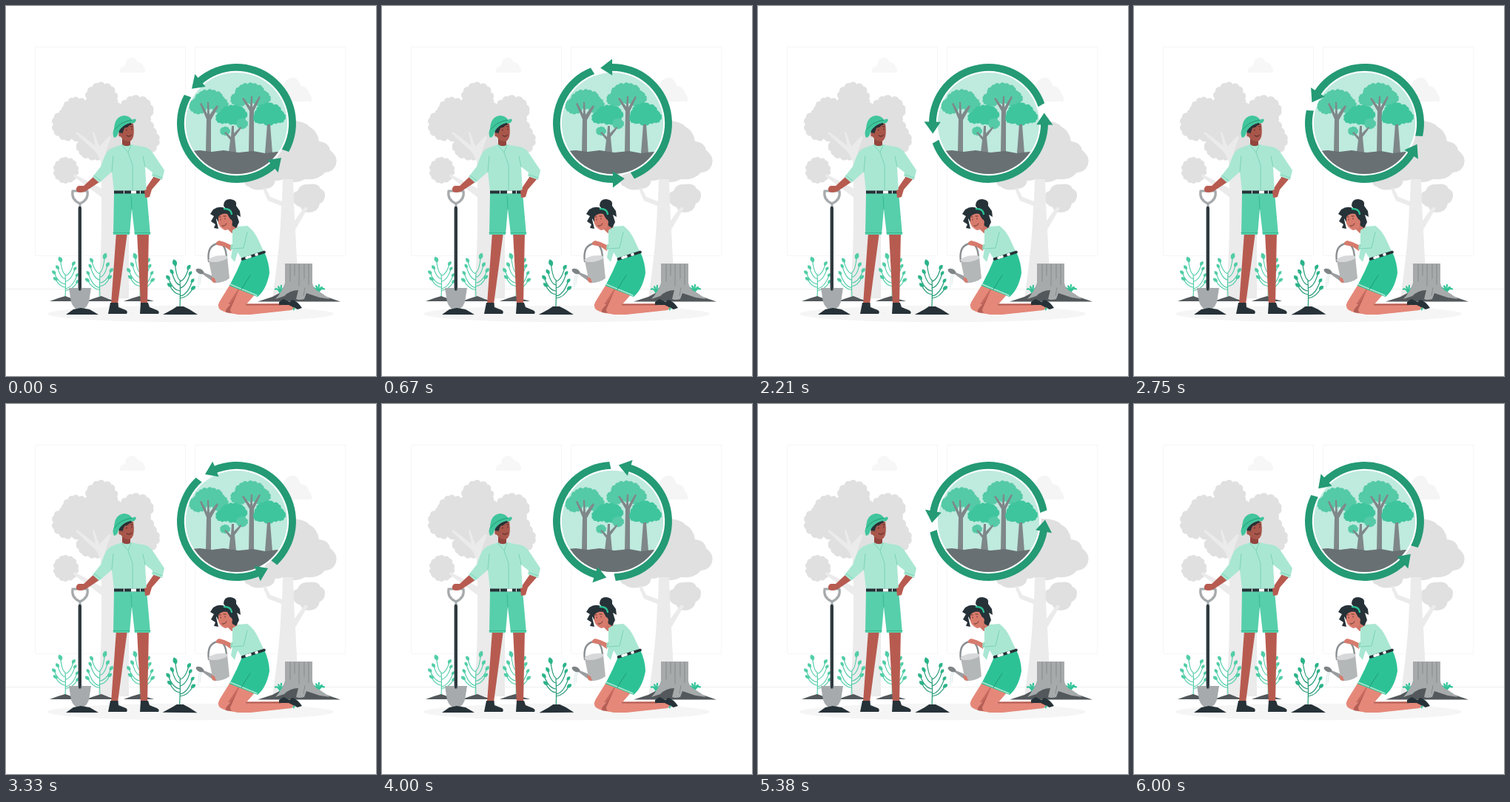
Animation, 500 px wide and 500 px high, one loop 6.04 s. Source, as an HTML page:

```html
<!DOCTYPE html>
<html lang="en">
<head>
<meta charset="utf-8">
<title>Planting trees</title>
<style>
html, body { margin: 0; width: 100%; height: 100%; overflow: hidden; background: #fff; }
svg { display: block; width: 100vw; height: 100vh; }
.line { fill: none; stroke-linecap: round; stroke-linejoin: round; }
</style>
</head>
<body>
<svg viewBox="0 0 500 500">
  <defs><clipPath id="lens"><circle cx="311.5" cy="158.5" r="68.6"/></clipPath></defs>

  <g fill="#fff" stroke="#f6f6f6">
    <rect x="39.5" y="55.5" width="203" height="282"/>
    <rect x="255.5" y="55.5" width="203" height="282"/>
  </g>
  <path d="M0 382.5H500" stroke="#efefef"/>
  <path fill="#f7f7f7" d="M154 90Q153 82 161 81Q162 69 171 70Q176 71 178 76Q185 77 186 82Q189 86 188 90Z"/>
  <path fill="#f5f5f5" d="M374 129V108Q380 95 390 97Q396 100 398 108Q408 109 409 117Q414 122 413 129Z"/>

  <!-- pale trees -->
  <g id="leftTree"></g>
  <g fill="#ebebeb">
    <path d="M124 395Q130 330 129 250L128 210L122 198L94 172L96 170L121 189L117 171L119 170L126 190L139 176L142 177L134 199L166 215V395Z"/>
    <path d="M92 227L130 247V259L91 230Z"/>
  </g>
  <g fill="#e0e0e0">
    <path d="M380 155Q402 154 410 163Q421 169 423 183Q436 184 438 195Q449 203 446 214Q443 224 431 225Q422 236 404 234Q390 242 375 234Q362 240 350 228V180Z"/>
    <path d="M322 236Q324 224 340 222Q362 219 364 233Q364 245 352 247Q335 251 328 244Q322 243 322 236Z"/>
    <path d="M387 259Q387 251 394 250Q397 240 409 241Q422 239 425 247Q432 250 431 257Q430 265 424 267Q422 278 410 279Q400 279 398 272Q388 269 387 259Z"/>
  </g>
  <path fill="#ebebeb" d="M360 395Q371 320 372 270L354 263L347 247L351 246L357 258L373 264L374 234H388L390 290L404 271L408 273L391 302Q393 350 397 395Z"/>

  <!-- lens -->
  <circle cx="311.5" cy="158.5" r="71" fill="#fff"/>
  <g clip-path="url(#lens)">
    <rect x="240" y="85" width="145" height="150" fill="#bfeade"/>
    <g id="lensBack"></g>
    <g fill="#7f8789">
      <path d="M270 198L271 153L262 132L264 131L272 146L272 130H274L275 147L285 134L287 136L277 154V198Z"/>
      <path d="M328 198L329 142L319 125L321 124L330 136L331 122H333L333 137L342 122L344 123L335 142V198Z"/>
    </g>
    <g id="lensFront"></g>
    <g fill="#7f8789">
      <path d="M301 198L303 181L295 171L297 170L304 177L305 162H308L308 172L317 163L318 165L309 177L311 198Z"/>
      <path d="M350 199L353 160H357L360 199Z"/>
    </g>
    <path fill="#697073" d="M240 197L262 195L278 197L294 195L314 198L334 196L350 199L366 197L385 199V235H240Z"/>
  </g>
  <g id="ring" fill="#249a75"></g>

  <!-- ground -->
  <ellipse cx="249.5" cy="416" rx="193.5" ry="11.3" fill="#f5f5f5"/>
  <g id="plants"></g>
  <g fill="#52585b">
    <path d="M59 399L70 395L80 392L91 396L101 399Z"/>
    <path d="M108 399L119 395L129 392L139 396L149 399Z"/>
    <path d="M159 399L170 395L180 392L190 396L200 399Z"/>
    <path d="M340 399.5L360 393L375 385L400 382L421 389L436 394L452 399.5Z"/>
  </g>

  <!-- stump -->
  <g id="grass" class="line" stroke="#34c398" stroke-width="2.2"></g>
  <path fill="#a7aaab" d="M377 348H414V374Q415 383 425 387L438 396L424 394L406 388L403 396Q396 398 392 396L395 384Q384 384 376 392L364 396Q374 385 377 374Z"/>
  <path class="line" stroke="#858a8c" d="M384 349V372M390 349V364M396 349V378M403 349V368M409 349V376M404 381L402 391"/>

  <!-- shovel -->
  <path class="line" stroke="#a6aaac" stroke-width="3.2" d="M90 250H110Q112 262 100 267Q88 262 90 250M100 267V271"/>
  <path class="line" stroke="#2f3a40" stroke-width="4.4" d="M99.8 273V383"/>
  <path fill="#a6aaac" d="M85 381H115L112 400Q108 410 100 412Q91 409 88 400Z"/>
  <path class="line" stroke="#2f3a40" stroke-width="3.6" d="M99.8 375V383"/>
  <path fill="#263238" d="M81 417L91 410L101 408L113 410L125 417Z"/>

  <!-- man -->
  <g fill="#b75b50">
    <path d="M149 306H164L151 403H142Z"/>
    <path d="M177 306H193L191 403H182Z"/>
    <path d="M118 231L126 238L108 250Q99 254 95 250Q94 245 98 243L105 243Z"/>
    <path d="M200 230L211 232L197 248L194 258L188 259L187 249Z"/>
  </g>
  <g fill="#263238">
    <path d="M141 401H151.500L152 407L162 411Q165 413 163 416H138Z"/>
    <path d="M182 401H192L194 407L204 411Q208 413 206 416H181Z"/>
  </g>
  <path fill="#57cfab" d="M146 252H190L195 309H174L170 274L167 309H145Z"/>
  <path class="line" stroke="#35b98f" d="M145 306.500H167M174 306.500H195M170 274L169 257"/>
  <path fill="#a9e7d3" d="M157 187L143 192Q136 195 132 206L128 217L117 231L126 239L143 224L146 251H190L188 217L198 225L197 230L211 235L214 222L198 198Q192 190 184 190L169 187Z"/>
  <path class="line" stroke="#76d1b3" stroke-width=".9" d="M157 188L165 198L169 188M165 198L171 215V249M143 224L145 203M188 217L185 203M119 229L128 236M199 228L211 232"/>
  <path fill="#263238" d="M146 249.500H190V253.500H146Z"/>
  <path fill="#fff" d="M169 249.500H176V253.500H169ZM159 249.500H160V253.500H159ZM181 249.500H182V253.500H181Z"/>
  <path fill="#b75b50" d="M187 249Q194 246 194 251V258L188 259Z"/>
  <path fill="#91453d" d="M157 177L168 180L168 188Q162 191 157 187Z"/>
  <path fill="#a9564b" d="M153 168Q155 161 165 157L172 159Q175 180 167 183Q157 183 154 174Z"/>
  <path fill="#263238" d="M152 167L160 161L169 157L170 160L160 165L157 173L153 174Z"/>
  <circle cx="155" cy="174" r="2.700" fill="#a9564b"/>
  <path class="line" stroke="#38231f" stroke-width=".9" d="M163 167V168M170 166V167M162 164L165 163M169 163L171 163M163 175Q167 178 170 174"/>
  <path fill="#41c59d" d="M146 166Q147 149 160 148Q168 149 170 154Q175 151 176 154Q174 160 168 158Q158 160 152 170Q151 177 146 178Q143 172 146 166Z"/>
  <path class="line" stroke="#219a74" d="M147 167Q153 157 170 154"/>

  <!-- watered plant -->
  <g id="sprout"></g>

  <!-- woman -->
  <path fill="#c76b60" d="M307 372L322 380L304 413Q296 414 290 409Q287 405 291 398Z"/>
  <path fill="#e58879" d="M303 376L317 378L300 403L372 402Q383 402 390 407L386 411L330 417Q296 417 288 409Q285 404 290 397Z"/>
  <path fill="#b45f55" d="M318 381L302 405Q296 410 297 414L304 415L330 383Z"/>
  <path fill="#e58879" d="M316 381L338 388L325 403L375 404L388 408L372 412L325 417Q302 418 303 410Z"/>
  <path class="line" stroke="#b45f55" stroke-width="1.800" d="M325 403.500H371"/>
  <path fill="#263238" d="M369 400L375 396L383 400L387 397Q394 399 400 408L394 410L382 404L369 404Z"/>
  <path fill="#34c398" d="M387 409L391 407L389 412Z"/>
  <path fill="#2dc296" d="M319 342L349 332Q356 348 356 361Q352 383 340 393L302 378L312 358Z"/>
  <path class="line" stroke="#a9e7d3" stroke-width="1.600" d="M303 376L339 391"/>
  <path class="line" stroke="#209b75" d="M318 383L330 364"/>
  <path fill="#cf7468" d="M301 291L312 288L313 303L305 307L300 302Z"/>
  <path fill="#a9e7d3" d="M306 303L314 298L326 297Q335 303 341 316L348 331L319 342L313 333L309 346L304 340L306 328Z"/>
  <path class="line" stroke="#263238" stroke-width="3.600" stroke-linecap="butt" d="M319.500 342L349 332.500"/>
  <path class="line" stroke="#fff" stroke-width="3.600" stroke-linecap="butt" d="M325 340.200L327 339.500M329 339L330 338.600M338 336L339 335.700"/>
  <g fill="#263238">
    <path d="M294 270Q294 261 303 261Q313 262 311 270L316 277L317 285L312 282L315 292L311 300L306 297L301 284L289 281L284 288L287 301L281 300L283 295L277 291L281 284L276 281L280 275Q289 269 297 274Z"/>
  </g>
  <path fill="#d77b6d" d="M287 283Q295 278 302 281L306 292Q305 303 296 303Q287 299 286 289Z"/>
  <path fill="#263238" d="M283 285Q286 276 298 276L306 282L307 290L303 288L299 281Q292 279 287 285L287 292Z"/>
  <path class="line" stroke="#2dc296" stroke-width="2.400" d="M295 274Q304 274 305 281"/>
  <path class="line" stroke="#5a2c27" stroke-width=".9" d="M290 288V289M296 287V288M288 285H290M294 284L297 284M292 297Q296 298 298 294"/>

  <!-- watering can -->
  <path class="line" stroke="#8b9092" stroke-width="2.400" d="M274 345Q271 324 286 321Q297 320 298 340"/>
  <path fill="#999d9f" d="M260 357L279 365V372L264 361Z"/>
  <path fill="#b4b7b8" d="M274 344L299 339L302 368Q293 375 280 374Z"/>
  <ellipse cx="286.500" cy="341.500" rx="13" ry="4" transform="rotate(-10 286.500 341.500)" fill="#d6d8d9"/>
  <ellipse cx="262" cy="358.500" rx="5.800" ry="3.200" transform="rotate(25 262 358.500)" fill="#7e8486"/>
  <path class="line" stroke="#cfe0e2" stroke-width=".8" d="M262 363Q259 370 260 380M264 363Q262 368 262 376"/>
  <path fill="#d77b6d" d="M277 366L282 368L284 374L279 373Z"/>
  <path fill="#d77b6d" d="M306 324L304 331L295 325L285 323Q282 319 288 317L295 319Z"/>
  <path fill="#a9e7d3" d="M319 301Q325 304 324 312L321 328L303 329L304 322L315 319Z"/>
  <path class="line" stroke="#76d1b3" stroke-width=".9" d="M306 328L321 327L326 306M306 323L304 329"/>
</svg>

<script>
const LOOP = 6040, SWAY = LOOP / 4, CX = 311.5, CY = 158.5;
const el = id => document.getElementById(id);
const polar = (r, deg) => {
  const a = deg * Math.PI / 180;
  return (CX + r * Math.cos(a)).toFixed(2) + ' ' + (CY + r * Math.sin(a)).toFixed(2);
};

// Ellipse with a scalloped edge
function blob(cx, cy, rx, ry, n, fill) {
  let d = '';
  for (let i = 0; i <= n; i++) {
    const a = i * 2 * Math.PI / n, k = i % 2 ? 0.9 : 0.96;
    const x = (cx + rx * k * Math.cos(a)).toFixed(1), y = (cy + ry * k * Math.sin(a)).toFixed(1);
    const r = (2.2 * Math.max(rx, ry) / n * 1.6).toFixed(1);
    d += i ? `A${r} ${r} 0 0 1 ${x} ${y}` : `M${x} ${y}`;
  }
  return `<path d="${d}Z" fill="${fill}"/>`;
}
const blobs = (fill, list) => list.map(b => blob(...b, fill)).join('');

// Twigs: height on the stem, leaf centre x and y, leaf length
const TWIGS = [
  [-36, -7, -59, 10], [-34, 12, -53, 8], [-29, -11, -47, 8], [-25, 14, -45, 7],
  [-21, -16, -39, 8], [-14, 17, -35, 7], [-16, -14, -29, 8], [-11, 18, -25, 8]
];
function plant(x, y, scale, leaf, stem) {
  let twigs = 'M0 0Q1 -20 0 -36', leaves = '';
  for (const [h, lx, ly, len] of TWIGS) {
    twigs += `M0 ${h}Q${lx * 0.6} ${h - 1} ${lx} ${ly}`;
    const turn = Math.atan2(ly - h, lx * 1.1) * 180 / Math.PI;
    leaves += `<path transform="translate(${lx} ${ly}) rotate(${turn.toFixed(0)})" d="M${-len / 2} 0Q0 ${-len * 0.62} ${len / 2} 0Q0 ${len * 0.62} ${-len / 2} 0Z"/>`;
  }
  return `<g transform="translate(${x} ${y}) scale(${scale})" fill="${leaf}">` +
    `<path class="line" d="${twigs}" stroke="${stem}" stroke-width="1.2"/>${leaves}</g>`;
}

el('leftTree').innerHTML = blobs('#e0e0e0', [
  [129, 125, 22, 22, 14], [95, 143, 20, 20, 14], [84, 160, 22, 22, 14], [176, 141, 24, 20, 14],
  [184, 181, 24, 22, 14], [127, 160, 46, 36, 24], [165, 165, 36, 30, 18], [120, 190, 26, 18, 16], [81, 222, 17, 18, 14]
]);
el('lensBack').innerHTML = blobs('#55caa6', [
  [275, 126, 21, 13, 18], [260, 135, 13, 11, 14], [289, 134, 12, 11, 14],
  [330, 118, 22, 14, 18], [315, 126, 12, 10, 14], [345, 125, 13, 11, 14]
]);
el('lensFront').innerHTML = blobs('#3fc59d', [
  [307, 147, 20, 13, 16], [292, 151, 9, 8, 10], [355, 146, 20, 15, 16],
  [370, 150, 8, 8, 10], [342, 151, 8, 8, 10]
]) + blobs('#55caa6', [[296, 169, 7, 6, 10], [319, 159, 8, 7, 10]]);

el('plants').innerHTML =
  plant(80, 394, '.95 .87', '#51cda7', '#51cda7') +
  plant(127, 394, '-.95 .95', '#51cda7', '#51cda7') +
  plant(181, 394, '.95', '#51cda7', '#51cda7');

el('sprout').innerHTML = plant(235, 406, '1', '#2bb38a', '#249a75') +
  '<path fill="#263238" d="M212 417L225 410L231 406H240L248 410L259 417Z"/>';

el('grass').innerHTML = [[371, 389], [422, 388]].map(([x, y]) =>
  [-7, -3, 1, 5, 8].map(dx => `<path d="M${x} ${y}Q${x + dx * 0.4} ${y - 8} ${x + dx} ${y - 12 + Math.abs(dx) * 0.8}"/>`).join('')
).join('');

// Two arc arrows, half a turn apart
el('ring').innerHTML = [217.7, 37.7].map(tip => {
  const base = tip + 12, tail = tip + 171.5;
  return `<path d="M${polar(80.5, base - 1)}A80.5 80.5 0 0 1 ${polar(80.5, tail - 0.7)}` +
    `L${polar(70.7, tail + 0.7)}A70.7 70.7 0 0 0 ${polar(70.7, base - 1)}Z"/>` +
    `<path d="M${polar(76.5, tip)}L${polar(87, base)}L${polar(64.8, base)}Z"/>`;
}).join('');

const ring = el('ring'), sprout = el('sprout');

// 0, +1, -1, 0 degrees with straight steps between
function swayAngle(p) {
  if (p < 0.25) return p * 4;
  if (p < 0.75) return 1 - (p - 0.25) * 4;
  return (p - 1) * 4;
}

function draw() {
  const t = performance.now() % LOOP;
  ring.setAttribute('transform', `rotate(${360 * t / LOOP} ${CX} ${CY})`);
  sprout.setAttribute('transform', `rotate(${swayAngle(t % SWAY / SWAY)} 235.5 379)`);
  requestAnimationFrame(draw);
}
draw();
</script>
</body>
</html>
```
